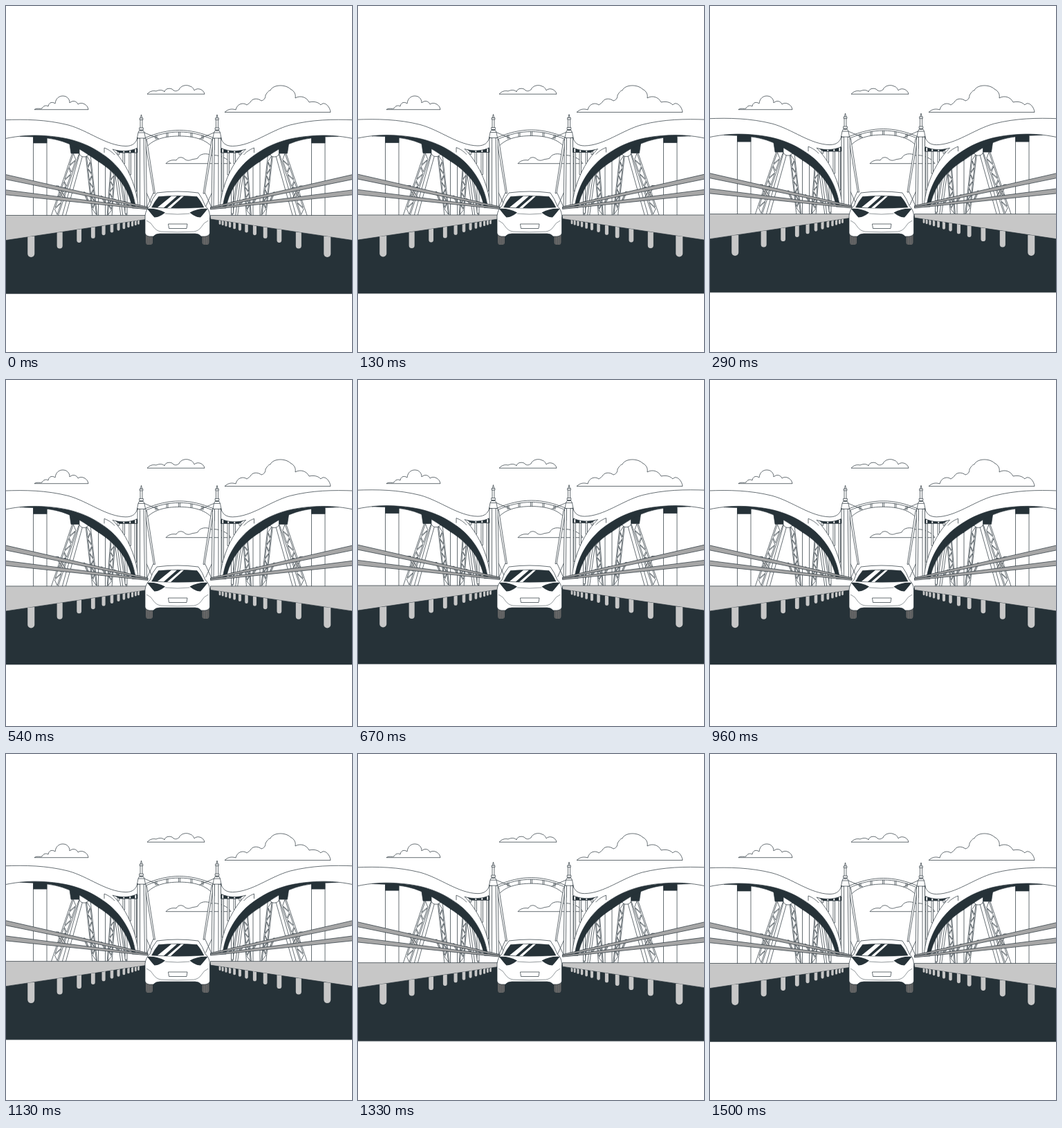
Recreate the animation shown at these times as an HTML page with a canvas. Size 500 by 500 pixels, loop 1540 ms.

```html
<!DOCTYPE html>
<html lang="en">
<head>
<meta charset="utf-8">
<title>Car on a bridge</title>
<style>
html, body { margin: 0; width: 100%; height: 100%; overflow: hidden; background: #fff; }
canvas { display: block; width: 500px; height: 500px; }
</style>
</head>
<body>
<canvas id="stage" width="500" height="500"></canvas>
<script>
const ctx = document.getElementById('stage').getContext('2d');
const LOOP = 1540, SWAY = 5.6, LEAD = 15;
const BRIDGE_AXIS = 250.25, CAR_AXIS = 247.75;
const INK = '#263238', WHITE = '#fff', LIGHT = '#c7c7c7', MID = '#a6a6a6';

function shape(d, fill, stroke = INK, width = 0.7) {
  const path = new Path2D(d);
  if (fill) { ctx.fillStyle = fill; ctx.fill(path); }
  if (stroke) { ctx.strokeStyle = stroke; ctx.lineWidth = width; ctx.stroke(path); }
}

const line = (x1, y1, x2, y2, width) => shape(`M${x1} ${y1}L${x2} ${y2}`, null, INK, width);

function beam(x1, y1, x2, y2, w1, w2 = w1, fill = WHITE) {
  shape(`M${x1} ${y1}h${w1}L${x2 + w2} ${y2}h${-w2}Z`, fill);
}

function mirrored(draw, axis) {
  draw();
  ctx.save();
  ctx.translate(2 * axis, 0);
  ctx.scale(-1, 1);
  draw();
  ctx.restore();
}

// A beam whose face carries rows of alternating triangles.
function truss(x1, y1, x2, y2, w, rows) {
  beam(x1, y1, x2, y2, w);
  const at = (k, side) => {
    const u = k / rows, inset = w * 0.18;
    return [x1 + (x2 - x1) * u + (side ? w - inset : inset), y1 + (y2 - y1) * u];
  };
  for (let k = 0; k + 1.75 <= rows; k++) {
    const side = k % 2;
    shape(`M${at(k + 0.12, side)}L${at(k + 0.98, !side)}L${at(k + 1.75, side)}Z`, WHITE);
  }
}

function clouds() {
  shape('M41 149.7C44 147 49 149 52 148C54 144 58 143 61 145C62 139 67 138 71 141C72 133 77 130 82 130C88 130 92 134 92 140C96 136 102 137 104 142C109 138 118 142 119 149.7Z', WHITE);
  shape('M204 127.3C208 123 212 122 217 123C221 121 227 121 229 124C230 118 240 118 242 122C246 124 248 122 250 121C252 115 261 113 266 116C270 117 271 120 272 122C277 117 286 121 287 127.3Z', WHITE);
  shape('M316 153.5C321 149 326 148 332 150C334 141 343 139 348 143C351 141 352 140 353 139C356 133 364 133 369 137C373 136 375 133 375 129C378 124 380 122 382 122C386 113 404 113 411 120C417 123 419 128 418 133C425 129 434 131 438 139C447 137 452 140 455 143C459 137 468 144 469 153.5Z', WHITE);
  shape('M231 227.7C235 223 241 222 246 223C249 217 256 218 259 222C263 224 266 223 268 222C272 221 275 221 277 220C280 213 290 212 297 216C307 214 322 221 325 227.7Z', WHITE);
}

function portal() {
  shape('M200 191C219 183 235 179.5 250.5 179.5C266 179.5 282 183 301 191L301 208C291 192 270 188 250.5 188C231 188 210 192 200 208Z', WHITE);
  shape('M201 193.5C219 185.5 235 182 250.5 182C266 182 282 185.5 300 193.5', null);
  for (const x of [217, 233, 250.5, 268, 284]) {
    const top = 182 + (x - 250.5) ** 2 / 240;
    line(x - 1, top, x - 1, top + 6);
    line(x + 1, top, x + 1, top + 6);
  }
}

function tower() {
  line(200, 183, 221, 192);
  beam(200.5, 194, 213.5, 271, 3, 2);
  line(203, 270, 212, 290);
  line(213, 270, 204, 290);
  beam(189.5, 191, 189.5, 291, 4);
  beam(199, 191, 200.5, 291, 3);
  shape('M189.5 191L191 183L192.5 180H198.5L200 183L201.5 191Z', WHITE);
  line(191, 183, 200, 183);
  shape('M194 180V163L195.5 157L197 163V180Z', WHITE);
  shape('M193.2 162h4.6v2.5h-4.6ZM192.7 176h5.6v3h-5.6Z', WHITE);
}

function arch() {
  // Uprights standing below the arch.
  beam(39.5, 190, 39.5, 304, 19.5);
  shape('M39.5 187H59V198H39.5Z', INK);
  beam(106, 215, 81, 304, 5);
  truss(96, 212, 65, 304, 10, 9);
  truss(115, 215, 125, 304, 7, 9);
  shape('M91 193L107 202V213H94Z', INK);
  shape('M106 201L119.5 209V213Q118 218 113 218Q107 218 106 213Z', WHITE);
  beam(133.5, 216, 133.5, 304, 10);
  shape('M133.5 212L143.5 220V225H133.5Z', INK);
  truss(151, 236, 146, 304, 7, 8);
  beam(157, 238, 166, 304, 3);
  beam(164, 247, 173, 302, 2);
  beam(172, 256, 172, 300, 3);
  for (const [x, end] of [[161, 215], [169, 228], [178, 244], [186, 268]]) {
    beam(x, 206, x, end, 2.5);
  }
  shape('M155 206H190V212H164Z', INK);
  for (const x of [169, 178, 186]) beam(x, 206, x, 212, 2.5);

  shape('M20 188.3C40 186 52 187 62 188C98 191 122 201 145 218C168 235 184 263 187.5 292H182.5C177 262 159 241 134 225C110 209 92 195 60 191C46 189 34 189 20 188.3Z', INK, INK, 0.6);
  shape('M-3 164.7C28 163.5 58 164 90 172C119 180 145 202 173 202.5C183 202.5 188 198 190 190V205C181 210 166 211 154 207C172 225 188 255 191.5 292H187.5C184 263 168 235 145 218C122 201 98 191 62 188C40 186 20 187 -3 192Z', WHITE);
  shape('M142 212V205C150 208 154 212 157 215', null);
}

function guardrail() {
  beam(72, 260, 82, 277, 4, 4, LIGHT);
  beam(84, 262, 74, 278, 2.5, 2.5, LIGHT);
  for (const x of [112, 137, 156, 171]) {
    beam(x, 243 + x * 0.232, x + 5, 266 + x * 0.132, 2, 2, LIGHT);
  }
  shape('M-3 243L205 290.5V292.5L-3 250Z', MID);
  shape('M-3 265.5L205 292V294L-3 272.5Z', MID);
  shape('M-3 302.5H205V308L-3 339Z', LIGHT);

  // Evenly spaced posts, shrinking with perspective toward the axis.
  for (let k = 0; k < 12; k++) {
    const scale = 1 / (1 + 0.24 * k), x = BRIDGE_AXIS - 214 * scale;
    const r = 5 * scale, top = 338.5 - x * 0.149, bottom = 298 + 65 * scale;
    ctx.fillStyle = LIGHT;
    ctx.beginPath();
    ctx.moveTo(x - r, top + 0.5);
    ctx.lineTo(x - r, bottom - r);
    ctx.arc(x, bottom - r, r, Math.PI, 0, true);
    ctx.lineTo(x + r, top - 0.5);
    ctx.fill();
  }
}

function bridge() {
  portal();
  mirrored(tower, BRIDGE_AXIS);
  mirrored(arch, BRIDGE_AXIS);
  shape('M-3 338L203 306H298L503 338V415.7H-3Z', INK, INK, 0.6);
  mirrored(guardrail, BRIDGE_AXIS);
}

function wheel() {
  shape('M202 329H212V342Q212 345 208 345H205Q202 345 202 341Z', '#666', null);
  shape('M204 331V344M207 332V345M210 333V344', null, '#4d5559', 0.6);
}

function rearLight() {
  shape('M204 293C212 292 222 294 230 298.5C226 302 220 305.5 214.5 305.5C211 302 208 298 204 293Z', INK, null);
  shape('M203 310Q210 313 213 319Q217 325 224 326', null, INK, 0.5);
}

function car() {
  mirrored(wheel, CAR_AXIS);
  shape('M218 270Q247.75 266 278 270Q284 278 288 289Q294 294 294.5 303V328Q294 332 288 333H282Q279 329 273 329H222.5Q216 329 213 333H207Q201.5 332 201 328V303Q202 294 208 289Q211 278 218 270Z', WHITE);
  shape('M220.5 275.5Q248 273 276 275.5Q281 281 286 291Q247 293.5 210.5 291Q215 282 220.5 275.5Z', INK, INK, 0.5);
  shape('M219 291L239 274.7H247L228 291.5ZM233 291.8L253 274.7H257L238 292Z', WHITE, null);
  mirrored(rearLight, CAR_AXIS);
  shape('M230 300Q248 302 265.5 300M224 326Q248 327.5 271.5 326', null, INK, 0.5);
  shape('M234.5 315H262L261 321.5H235.5Z', WHITE);
}

function render(time) {
  const phase = 2 * Math.PI * ((time + LEAD) % LOOP) / LOOP;
  ctx.fillStyle = WHITE;
  ctx.fillRect(0, 0, 500, 500);
  clouds();
  ctx.save();
  ctx.translate(0, -SWAY * (1 - Math.cos(phase)) / 2);
  bridge();
  ctx.restore();
  car();
}

const start = performance.now();
function tick() {
  render(performance.now() - start);
  requestAnimationFrame(tick);
}
tick();
</script>
</body>
</html>
```
